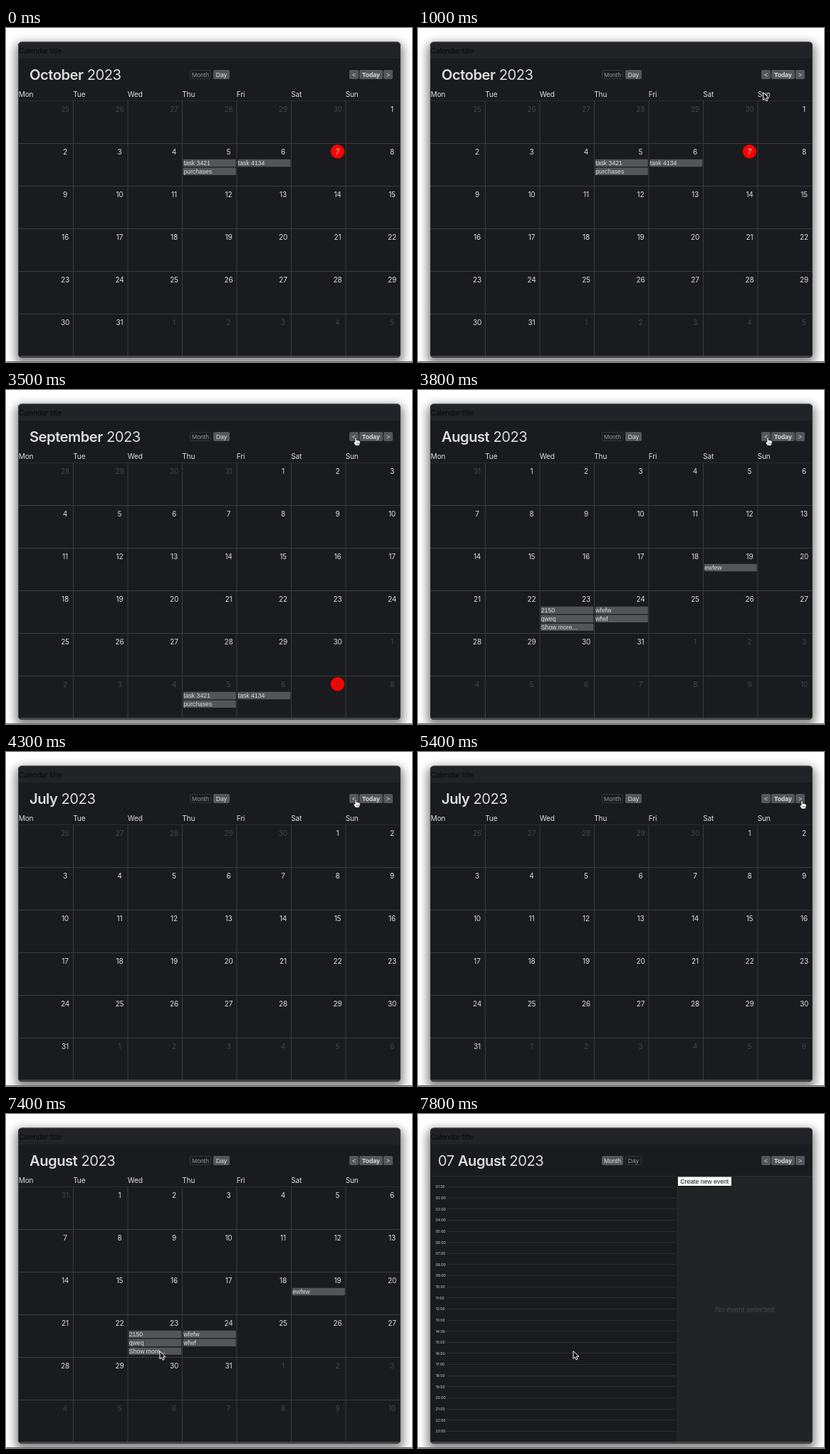
Animation, 570 px wide and 470 px high, one loop 8 s. Source, as an HTML page:

```html
<!DOCTYPE html>
<html lang="en">
<head>
<meta charset="utf-8">
<title>Calendar</title>
<style>
html, body { margin: 0; width: 100%; height: 100%; overflow: hidden; background: #fff; }
#win {
  position: absolute; left: 17px; top: 19.5px; width: 537px; height: 444.5px;
  border-radius: 5.5px; background: #1a1b1e;
  box-shadow: 0 5px 13px 4px #888;
}
svg { position: absolute; left: 0; top: 0; width: 570px; height: 470px; }
text { font: 10.1px Inter, sans-serif; letter-spacing: -.02em; fill: #ddd; white-space: pre; }
.title { font-size: 20.2px; letter-spacing: -.025em; }
.title tspan { font-weight: 600; }
.ui { font: 8.67px "Liberation Sans", Arial, sans-serif; letter-spacing: 0; }
.bold { font-weight: 700; }
.mid { text-anchor: middle; }
.dim { fill: #444548; }
.off { fill: #96979a; }
.hour { font-size: 5.1px; font-weight: 500; fill: #b4b5b7; }
.line { stroke: #3b3c3f; fill: none; }
.soft { stroke: #2c2d30; }
</style>
</head>
<body>
<div id="win"></div>
<svg id="stage" viewBox="0 0 570 470"></svg>
<script>
const LOOP = 8000;
const MONTHS = ['January', 'February', 'March', 'April', 'May', 'June', 'July',
  'August', 'September', 'October', 'November', 'December'];
const EVENTS = {
  '8-19': ['ewfew'],
  '8-23': ['2150', 'qweq', 'Show more...'],
  '8-24': ['wfefw', 'wfwf'],
  '10-5': ['task 3421', 'purchases'],
  '10-6': ['task 4134']
};
const TODAY = '10-7';
// [start time, month number, or 0 for the day view]
const VIEWS = [[0, 10], [3000, 9], [3700, 8], [4300, 7], [5700, 8], [7800, 0]];
// [time, x, y] of the pointer tip
const PATH = [
  [300, 532.5, 186.5], [500, 532.5, 186.5], [1100, 475, 71.5], [1400, 475, 71.5],
  [1600, 470, 220], [1900, 491, 66.5], [4900, 491, 66.5], [5200, 514, 62.5],
  [5400, 539, 68.3], [5900, 539, 68.3], [6300, 260, 345], [6400, 260, 345],
  [6800, 219, 330], [7000, 221, 324], [7200, 221, 324], [7400, 216, 334], [7500, 218, 333.5]
];

const text = (x, y, s, cls = '') => `<text x="${x}" y="${y}" class="${cls}">${s}</text>`;
const rect = (x, y, w, h, fill, extra = '') =>
  `<rect x="${x}" y="${y}" width="${w}" height="${h}" fill="${fill}" ${extra}/>`;
const line = (d, cls = '') => `<path d="${d}" class="line ${cls}"/>`;
const group = (id, body) => `<g id="${id}">${body}</g>`;

function button(x, w, label, on = true, cls = '') {
  const box = on ? rect(x, 59, w, 13, '#555659', 'rx="2"')
    : rect(x + .5, 59.5, w - 1, 12, 'none', 'rx="2" stroke="#35363a"');
  return box + text(x + w / 2, 68.6, label, `ui mid ${on ? '' : 'off'} ${cls}`);
}

const modes = day => button(258, 30, 'Month', day) + button(291, 23, 'Day', !day);

function monthView(month) {
  const first = new Date(Date.UTC(2023, month - 1, 1));
  const lead = (first.getUTCDay() + 6) % 7;
  let out = text(33, 73, `<tspan>${MONTHS[month - 1]}</tspan> 2023`, 'title') + modes(false);
  'Mon Tue Wed Thu Fri Sat Sun'.split(' ').forEach((d, i) => out += text(17.8 + i * 76.5, 97.3, d));
  for (let i = 0; i < 6; i++) {
    out += line(`M18 ${102.5 + 60 * i}H553`, i ? '' : 'soft');
    out += line(`M${94.5 + 76.5 * i} 102V462`);
  }
  for (let i = 0; i < 42; i++) {
    const date = new Date(Date.UTC(2023, month - 1, 1 - lead + i));
    const m = date.getUTCMonth() + 1, d = date.getUTCDate(), key = m + '-' + d;
    const col = i % 7, x = 83 + 76.5 * col, y = 114 + 60 * Math.floor(i / 7);
    if (key === TODAY) out += `<circle cx="${x}" cy="${y - .2}" r="9.75" fill="#f00"/>`;
    out += text(x, y + 3.7, d, m === month ? 'mid' : 'mid dim');
    (EVENTS[key] || []).forEach((name, n) => {
      const left = 19.3 + 76.5 * col, top = y + 10.8 + 11.8 * n;
      out += rect(left, top, 74, 10.4, '#545558', 'rx="1"') + text(left + .5, top + 8.2, name, 'ui');
    });
  }
  return out;
}

function dayView() {
  let out = text(28, 73, '07 <tspan>August</tspan> 2023', 'title') + modes(true);
  out += rect(365, 88, 188, 374, '#222325') + line('M18 87.5H553M364.5 88V462', 'soft');
  for (let h = 1; h < 24; h++) {
    const y = 102.5 + 15.63 * (h - 1);
    out += text(24.8, y + 1.9, String(h).padStart(2, '0') + ':00', 'hour');
    out += line(`M41 ${Math.floor(y) + .5}H362`, 'soft');
  }
  out += rect(365, 88.5, 75, 12.5, '#fff');
  out += `<text x="402.3" y="97.8" class="ui mid" style="fill:#111">Create new event</text>`;
  return out + text(458.7, 279, 'No event selected', 'mid dim');
}

const ARROW = `<path d="M0 0V10.8L2.5 8.5L4.3 12.3L6.2 11.4L4.5 7.8H8Z"
  fill="#111" stroke="#fff" stroke-width="1"/>`;
const HAND = `<g transform="scale(1.06)"><path d="M-1 .7Q0-.6 1 .7V4L2.2 3.7L3.4 4.3L4.6 4.3L5.8 5.3
  V8L4.6 11H-.4L-2.8 7.2Q-3.2 5.6-1 6.4Z" fill="#fff" stroke="#111" stroke-width=".7" stroke-linejoin="round"/>
  <path d="M1.2 7V9.4M2.7 7V9.4M4.1 7V9.4" stroke="#333" stroke-width=".5"/></g>`;

const shared = '<path d="M17 43V25Q17 19.5 22.5 19.5H548.5Q554 19.5 554 25V43Z" fill="#222326"/>'
  + `<text x="17.8" y="36" style="fill:#08090b">Calendar title</text>`
  + button(482, 13, '&lt;') + button(496, 33, 'Today', true, 'bold') + button(530, 13, '&gt;');
const frame = '<rect x="17.5" y="20" width="536" height="443.5" rx="5" fill="none" stroke="#3c3d40"/>'
  + rect(20, 461.5, 531, 1, '#6b6c6e') + rect(0, 469, 570, 1, '#666');

const stage = document.getElementById('stage');
stage.innerHTML = shared
  + [7, 8, 9, 10].map(m => group('view' + m, monthView(m))).join('')
  + group('view0', dayView()) + frame
  + group('arrow', ARROW) + group('hand', HAND);

const el = id => document.getElementById(id);
const show = (id, on) => el(id).style.display = on ? '' : 'none';

function pointer(t) {
  const i = PATH.findIndex(p => p[0] > t);
  if (i < 0) return PATH[PATH.length - 1].slice(1);
  if (i === 0) return PATH[0].slice(1);
  const [a, b] = [PATH[i - 1], PATH[i]], k = (t - a[0]) / (b[0] - a[0]);
  return [1, 2].map(n => a[n] + (b[n] - a[n]) * k);
}

function draw(now) {
  const t = Math.floor(now % LOOP / 100) * 100; // the pointer moves ten times a second
  const view = VIEWS.filter(v => v[0] <= t).pop()[1];
  [0, 7, 8, 9, 10].forEach(v => show('view' + v, v === view));
  const hand = t >= 1900 && t < 6000;
  show('hand', hand);
  show('arrow', !hand && t >= 300);
  el(hand ? 'hand' : 'arrow').setAttribute('transform', `translate(${pointer(t)})`);
}

const start = performance.now();
function tick() {
  draw(performance.now() - start);
  requestAnimationFrame(tick);
}
tick();
</script>
</body>
</html>
```
